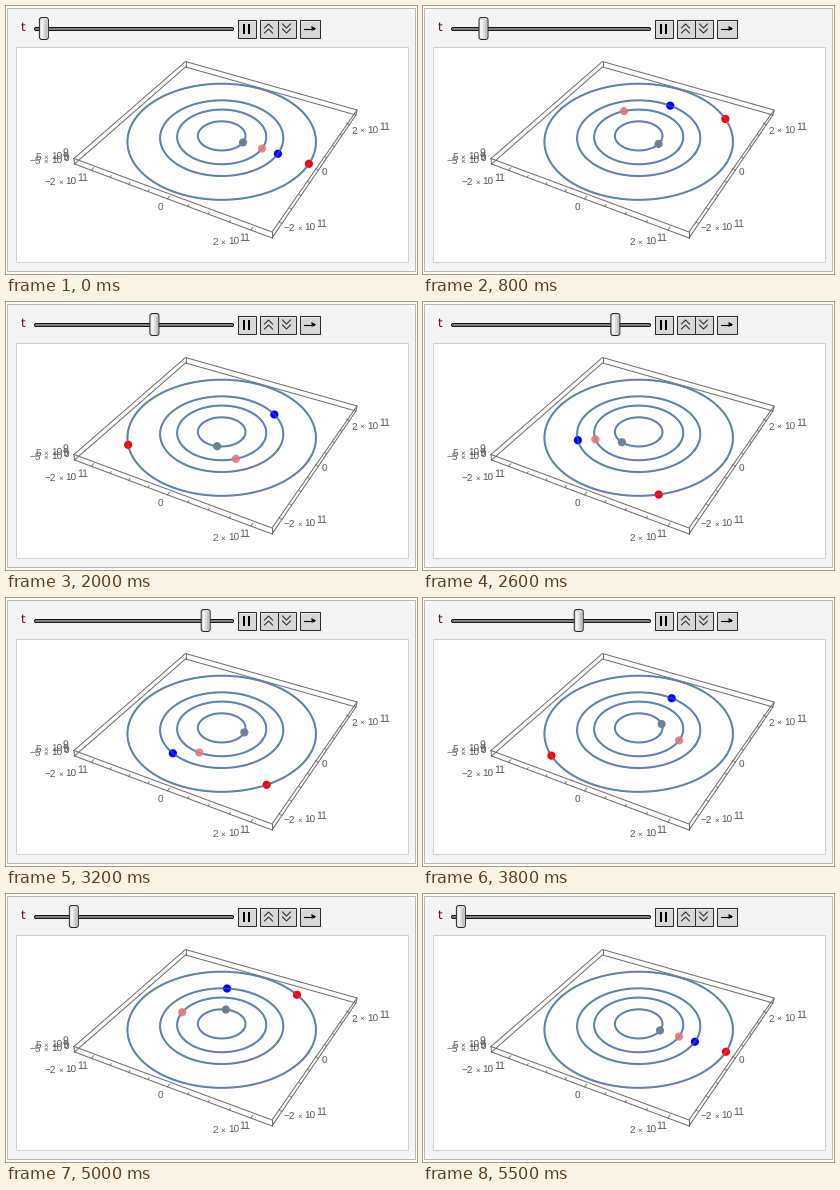
A matplotlib script for the animation above (6000 ms loop, 411x268 px).

```python
import numpy as np
import matplotlib.pyplot as plt
from matplotlib.animation import FuncAnimation
from matplotlib.patches import Circle, FancyBboxPatch, Polygon, Rectangle

W, H, DPI = 411, 268, 64
PX = 72 / DPI  # points per pixel

# Orbit radius and angular speed relative to the outermost planet, colour
PLANETS = [
    (0.254, 7.815, "#708090"),
    (0.475, 3.057, "#f08080"),
    (0.656, 1.881, "#0000ff"),
    (1.000, 1.000, "#ff0000"),
]
START = -27.9   # viewing angle of the x axis, degrees
STEP = 14.65    # outer planet's advance per step, degrees
LAG = 0.915     # steps lost before the motion is under way
RING = "#5e81b5"
EDGE = "#6b6b6b"
TEXT = "#565656"

plt.rcParams["text.hinting"] = "none"
fig = plt.figure(figsize=(W / DPI, H / DPI), dpi=DPI, facecolor="white")
ax = fig.add_axes([0, 0, 1, 1])
# Whole numbers from 1 fall on pixel centres
ax.set_xlim(0.5, W + 0.5)
ax.set_ylim(H + 0.5, 0.5)
ax.axis("off")


def project(radius, degrees):
    """Perspective view of a point in the orbital plane."""
    a = np.radians(degrees + START)
    x, y = radius * np.cos(a), radius * np.sin(a)
    w = 1 + 0.108 * y
    return 216.2 + 93.7 * x / w, 130 - 57.4 * y / w


def line(points, color=EDGE, width=1.0, z=2, **kw):
    xs, ys = zip(*points)
    ax.plot(xs, ys, color=color, lw=width * PX, zorder=z, **kw)


def rect(x0, y0, x1, y1, face, edge, z=1):
    ax.add_patch(Rectangle((x0, y0), x1 - x0, y1 - y0, facecolor=face,
                           edgecolor=edge, lw=PX, zorder=z))


def pill(x0, y0, x1, y1, r, face, edge, z):
    patch = FancyBboxPatch((x0, y0), x1 - x0, y1 - y0,
                           boxstyle=f"round,pad=0,rounding_size={r}",
                           facecolor=face, edgecolor=edge, lw=PX, zorder=z)
    return ax.add_patch(patch)


def label(x, y, s, size=10, color=TEXT, font="Liberation Sans", ha="left"):
    ax.text(x, y, s, fontsize=size * PX, color=color, family=font,
            ha=ha, va="baseline", zorder=5)


def power(x, y, mantissa, exponent):
    """Scientific notation, with its "10" starting at x."""
    label(x - 10, y, mantissa, ha="right")
    label(x - 5.2, y - 0.5, "×", 8, ha="center")
    label(x, y, "10")
    label(x + 11.7, y - 4, exponent, 10.5)


def draw_panel():
    rect(1, 2, 409, 265, "#f4f4f4", "#b9b9b9", 0)
    rect(10, 41, 402, 256, "white", "#d0d0d0", 0.5)
    label(14.7, 25.5, "t", 12, "#660000", "DejaVu Sans")
    pill(29, 22, 228, 25, 1.5, "#808080", "#141414", 2)


def draw_buttons():
    for x0, x1 in [(232, 250), (254, 272), (272, 290), (294, 314)]:
        rect(x0, 14, x1, 32, "#d8d8d8", "#2a2a2a", 2)
        line([(x0 + 1, 15), (x1 - 1, 15)], "#ececec", 1, 2.5)
    for x in (238.5, 243.5):
        line([(x, 18), (x, 28)], "black", 2, 3, solid_capstyle="butt")
    for x, flip in [(263, 1), (281, -1)]:
        for y in (-2.5, 2.5):
            line([(x + dx, 23 + y + flip * dy)
                  for dx, dy in [(-4, 2), (0, -2), (4, 2)]], "#222222", 1, 3)
    line([(298, 23), (308, 23)], "black", 1.1, 3)
    ax.add_patch(Polygon([(306, 20.5), (310.5, 23), (306, 25.5)],
                         facecolor="black", lw=0, zorder=3))


def draw_box():
    top = [(68.5, 153), (266.5, 226.5), (351.5, 104.5), (180, 56)]
    low = [(69, 158.5), (266.5, 232.5), (350.5, 109.5), (180, 61.5)]
    for face in (top, low):
        line(face + face[:1])
    for a, b in zip(top, low):
        line([a, b])

    depth = [0.953, 0.848, 1.047]
    for i, side in [(0, (0.6, -0.8)), (1, (-0.8, -0.5))]:
        a, b = np.array(low[i]), np.array(low[i + 1])
        for v in np.arange(-2, 2.01, 0.5):
            s = (v + 2.48) / 4.96
            wa, wb = (1 - s) * depth[i], s * depth[i + 1]
            p = (a * wa + b * wb) / (wa + wb)
            size = 3.5 if v % 2 == 0 else 2
            line([p, p + size * np.array(side)], width=0.9)

    power(60, 179.7, "−2", "11")
    label(152.3, 205.7, "0")
    power(222.3, 239.5, "2", "11")
    power(299, 225.7, "−2", "11")
    label(316.2, 170.7, "0")
    power(361.8, 128.2, "2", "11")
    power(45.5, 154.5, "5", "9")
    label(58.5, 156.5, "0")
    power(45.5, 158.5, "−5", "9")


def draw_rings():
    turn = np.linspace(0, 360, 181)
    for radius, _, _ in PLANETS:
        x, y = project(radius, turn)
        ax.plot(x, y, color=RING, lw=2 * PX, zorder=3)
        ax.plot(x, y, color=RING, lw=1.3 * PX, alpha=0.5, zorder=4.5)


draw_panel()
draw_buttons()
draw_box()
draw_rings()

dots = [ax.add_patch(Circle((0, 0), 4.1, facecolor=c, lw=0, zorder=4))
        for _, _, c in PLANETS]
thumb = pill(34, 12, 43, 34, 2.5, "#dcdcdc", "#262626", 6)
shine = ax.add_patch(Rectangle((35.5, 14), 2.5, 18, facecolor="#f3f3f3",
                               lw=0, zorder=7))
shade = ax.add_patch(Rectangle((40, 14), 2, 18, facecolor="#c4c4c4",
                               lw=0, zorder=7))


def update(k):
    # Hold, run forward, run back, hold
    step = max(0, min(k - 4, 55 - k))
    turn = max(0, STEP * (step - LAG))
    for dot, (radius, speed, _) in zip(dots, PLANETS):
        dot.center = project(radius, speed * turn)
    x = 38.4 + turn / 2
    thumb.set_x(x - 4.5)
    shine.set_x(x - 3)
    shade.set_x(x + 1.5)
    return [*dots, thumb, shine, shade]


anim = FuncAnimation(fig, update, frames=60, interval=100, repeat=True,
                     repeat_delay=0, blit=False)
plt.show()
```
